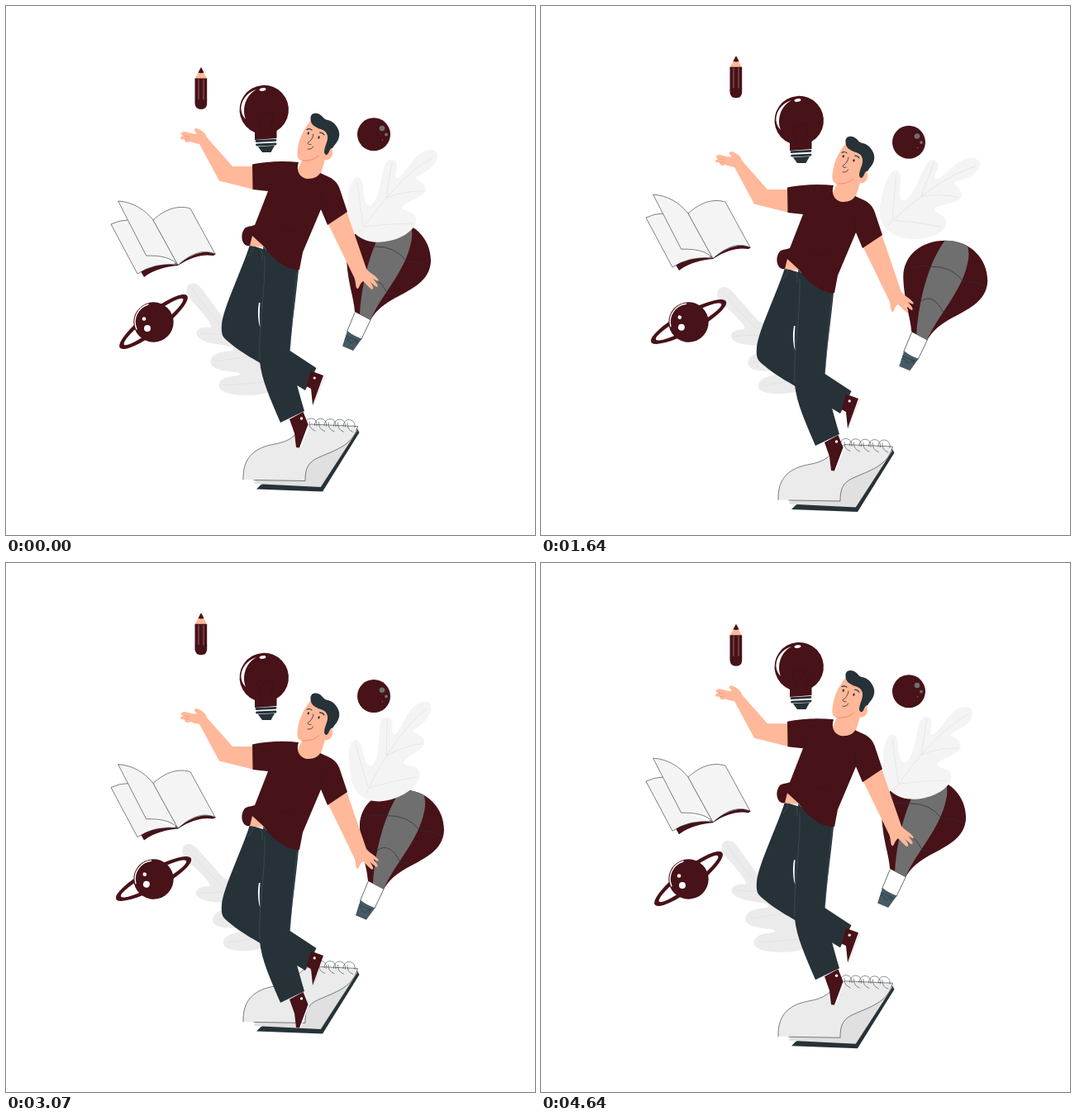
Animation of 640x640 px, one loop 4.71 s. Source, as an HTML page with a canvas:

```html
<!DOCTYPE html>
<html lang="en">
<head>
<meta charset="utf-8">
<title>Balancing ideas</title>
<style>
html, body { margin: 0; width: 100%; height: 100%; overflow: hidden; background: #fff; }
canvas { display: block; width: 100vw; height: 100vh; }
</style>
</head>
<body>
<canvas id="stage"></canvas>
<script>
const SIZE = 640, LOOP = 4710;
const MAROON = '#471218', DARK = '#263238', SKIN = '#ffb899', GREY = '#6f6f6f';
const PAGE = '#f4f4f4', SHEET = '#ebebeb', SHADE = '#e0e0e0', SLATE = '#455a64', WHITE = '#fff';

const canvas = document.getElementById('stage');
const ctx = canvas.getContext('2d');
const ratio = Math.max(1, window.devicePixelRatio || 1);
canvas.width = canvas.height = SIZE * ratio;
ctx.lineCap = ctx.lineJoin = 'round';

const paths = new Map();
function shape(d) {
  if (!paths.has(d)) paths.set(d, new Path2D(d));
  return paths.get(d);
}
function fill(d, color) {
  ctx.fillStyle = color;
  ctx.fill(shape(d));
}
function line(d, color = DARK, width = 0.7) {
  ctx.strokeStyle = color;
  ctx.lineWidth = width;
  ctx.stroke(shape(d));
}
function oval(x, y, rx, color, ry = rx, turn = 0) {
  ctx.fillStyle = color;
  ctx.beginPath();
  ctx.ellipse(x, y, rx, ry, turn, 0, Math.PI * 2);
  ctx.fill();
}
function moved(x, y, draw) {
  ctx.save();
  ctx.translate(x, y);
  draw();
  ctx.restore();
}
function turned(x, y, degrees, draw) {
  ctx.save();
  ctx.translate(x, y);
  ctx.rotate(degrees * Math.PI / 180);
  ctx.translate(-x, -y);
  draw();
  ctx.restore();
}

// Smooth periodic curve through [ms, value] pairs
function curve(keys) {
  const n = keys.length;
  const key = i => {
    const turn = Math.floor(i / n), [t, v] = keys[i - turn * n];
    return [t + turn * LOOP, v];
  };
  const slope = i => {
    const [t0, v0] = key(i - 1), [t1, v1] = key(i + 1);
    return (v1 - v0) / (t1 - t0);
  };
  return t => {
    let i = n - 1;
    while (i > 0 && keys[i][0] > t) i--;
    const [t0, v0] = key(i), [t1, v1] = key(i + 1);
    const h = t1 - t0, u = (t - t0) / h, w = 1 - u;
    return v0 * (1 + 2 * u) * w * w + v1 * u * u * (3 - 2 * u)
      + h * u * w * (slope(i) * w - slope(i + 1) * u);
  };
}
// Gentle ease in and out, rising over the first part of a cycle
const ease = p => 0.85 * (1 - Math.cos(Math.PI * p)) / 2 + 0.15 * p;
const rise = (p, top) => ease(p < top ? p / top : (1 - p) / (1 - top));
const bob = (t, cycles = 1) => rise(cycles * t / LOOP % 1, 0.5);
const drift = t => rise(t / LOOP, 0.38);
const swing = curve([[0, 0], [500, 5], [1140, 18], [1640, 24.5], [2070, 19], [2570, 0],
  [3070, -18], [3430, -23.5], [3790, -17.5], [4000, -13], [4570, -0.8]]);
const flutter = curve([[0, 0], [500, -2], [1210, -7.5], [1560, -8.2], [2070, -5],
  [3070, 7.6], [3430, 8.2], [3790, 6.2], [4570, 0.4]]);

function balloon() {
  const body = 'M422 370C421 352 413 335 412 304C412 277 434 259.500 463 259.500C493 259.500 514 281 514 308.500C513 334 489 343 466 356C454 363 446 371 441 380Z';
  fill(body, MAROON);
  ctx.save();
  ctx.clip(shape(body));
  fill('M463 259C446 280 431 325 428 373L441 380C452 352 483 322 490 286C493 274 490 264 486 258Z', GREY);
  line('M412 297Q429 287 446 291Q470 290 485 309Q501 309 513 316M420 335Q425 331 433 333Q448 322 461 347Q469 347 476 352', DARK, 0.7);
  ctx.restore();
  line('M422 371L412.500 394M441 380L430 403');
  fill('M413 393Q420 399 430.500 402.500L420 417L407 411.500Z', SLATE);
  line('M411 399L426 405M410 403Q413 400 415 405T421 406T424 408', DARK, 0.6);
}

function paleLeaf() {
  fill('M514 174C525 174 524 186 516 194C508 202 498 204 495 209C502 211 510 218 507 225C502 233 486 235 479 243C478 249 490 246 495 254C499 262 494 269 484 276C470 285 450 288 437 284C420 278 413 266 414 250C413 235 414 218 420 210C426 204 431 208 432 219C433 231 434 243 441 241C451 236 453 210 458 193C463 182 473 185 473 194C470 206 470 212 478 205C488 196 496 174 514 174Z', '#f4f4f4');
  line('M428 274Q450 242 474 217Q494 196 517 183M425 213L432 266M467 189L460 232Q484 223 505 224M434 267Q464 263 492 263', '#dedede', 0.6);
}

function greyLeaf() {
  fill('M219 347C216 336 228 331 236 341C246 354 257 370 265 380L298 402L330 440C335 455 325 466 312 469C295 472 270 472 261 465C254 460 258 452 268 449C276 447 284 448 283 444C275 442 255 442 249 435C244 427 252 419 266 418C273 417 277 417 274 413C265 409 240 410 232 400C227 393 235 387 247 389C250 386 243 378 235 368C228 360 221 354 219 347Z', SHEET);
  line('M225 341Q255 386 318 448M235 396L268 398M254 430L294 424M264 459L315 455', '#dedede', 0.6);
}

function notebook() {
  fill('M312 577L308 579.500L303 584.500L383 587.500L427.500 516L424 510Z', DARK);
  fill('M302 573L300 578L381 582L425 514L422 509L340 545Z', SHADE);
  fill('M287 573C286 545 302 534 325 530C352 525 348 515 368 506L425.500 508.500C420 530 402 536 381 545C366 551 362 558 362 574.500Z', SHEET);
  line('M300 573.500L362 574.500C362 558 366 551 381 545C402 536 420 530 425.500 508.500L368 506C348 515 352 525 325 530C302 534 286 545 287 573', DARK, 0.6);
  line('M381 582L426 513', DARK, 0.5);
  for (let i = 0; i < 5; i++) {
    moved(i * 11.5, i * 0.4, () => line('M362 507C362 495 378 497 376 508M367 503Q366 511 374 514', DARK, 0.55));
  }
}

function legs() {
  fill('M295 289C285 320 263 365 261 385C260 398 262 401 270 407C285 420 305 430 314 436L362 465L375.500 438L342 416L330 300Z', DARK);
  fill('M306 359C304 370 305 382 307.500 389C306.500 380 306.500 370 307.500 359Z', WHITE);
  fill('M311 290C322 306 340 318 354 319C351 350 346 385 343.500 417C347 442 354 466 361 490L332 504C320 476 309 452 307 430C305 400 314 345 311 290Z', DARK);
  line('M313 303C314 345 305 390 307 428M352 322Q346 380 343.500 416M299 291Q298 299 292 303M309 295Q311 300 310 306', SLATE, 0.6);
  fill('M369 441.500L384 447L371 483L369 463L363.500 460Z', MAROON);
  line('M385.500 448.500L372 483', '#d5d5d5', 0.7);
  fill('M343 500L359.500 491L365.500 506L355 534.500L351 534L349 517Z', MAROON);
  line('M366.500 507L356 534', WHITE, 1.2);
  oval(373.200, 450, 1.6, WHITE);
  oval(357.500, 499, 1.7, WHITE);
}

function face() {
  fill('M368 139C358 152 354 163 353 173C351 182 354 187 358 187L353 198C351 214 380 214 382 199L386 186C390 188 396 182 395 177L392 150Z', SKIN);
  line('M359 187Q371 188 378 181', '#f08b6c', 1);
  fill('M368.500 136C368 128 378 128 383 134C386 139 392 137 397 142C402 147 404 153 403 158C402 164 398 167 395 172C391 171 391 181 387 180C383 178 386 171 388 165C391 157 388 151 381 149C374 147 368 143 368.500 136Z', DARK);
  oval(365.800, 154, 1.1, DARK, 1.7, 0.3);
  oval(378.500, 159, 1.1, DARK, 1.7, 0.3);
  line('M364 149.500Q367 147.500 370 150M379.500 153Q383 153 385 156', DARK, 1.1);
  line('M372 155Q371 162 365 165.500Q365 168 369 167.500M365 173Q370 174 371.500 170', DARK, 0.8);
}

function man() {
  legs();
  fill('M300 194L274 194L243 159C241 152 235 150 231 148C226 148 228 152 231 154C227 156 222 153 216 152C209 153 212 157 215 157C209 158 210 163 216 161C216 165 219 166 223 164C227 166 231 166 234 167L258 211.500L300 222Z', SKIN);
  line('M215 157L222 158M216 161L222 161', '#f08b6c', 0.6);
  fill('M389 262L412 248L436 318C441 324 448 326 451 332C450 334 446 331 444 330C448 335 451 338 449 340C446 339 441 334 440 333C443 338 446 341 443 343C438 340 435 335 432 333C428 335 427 343 425 342C422 340 424 332 420 326L406 297Z', SKIN);
  fill('M298 276L312 292L294 290Z', SKIN);
  face();
  fill('M298 191.500C315 188 335 187 354 189C350 201 357 209 366 209C373 209 378 206 380 202L391 207C399 211 402 216 404 222L413 249L389 265L381 246L359 298L355 319C340 320 322 306 312 291L298 278L295 290C285 292 282 275 290 268C295 266 299 266 301 265L317 224L298.500 222Z', MAROON);
  line('M318 224Q321 218 323 212M381 245Q378 235 383 222M328 271Q338 276 351 270M299 278L304 272', '#2f1c22', 0.7);
}

function book() {
  fill('M163 321L167 328C180 318 196 315 208 314C225 303 238 300 251 302L254 300C238 293 222 303 208 311L172 315Z', MAROON);
  fill('M127 264Q137 259 147 259L171 301L208 313Q180 310 159 324Z', PAGE);
  line('M147 259Q137 259 127 264L159 324Q180 310 208 313', DARK, 0.6);
  const right = 'M178 259C194 244 210 241 223 245L253 300C237 293 222 301 208 313.500Z';
  fill(right, PAGE);
  line(right, DARK, 0.6);
  const turning = 'M136 236C153 237 168 246 178 259L208 313.500C200 304 187 302 170 302Z';
  fill(turning, PAGE);
  line(turning, DARK, 0.6);
}

function saturn() {
  const tilt = -0.661;
  oval(178.500, 382, 51.500, MAROON, 12.4, tilt);
  oval(178.500, 382, 45, WHITE, 7.6, tilt);
  oval(178.500, 382.500, 24.200, MAROON);
  line('M172 361A22 22 0 0 0 158 391', WHITE, 1.4);
  oval(167, 378.500, 2.3, WHITE);
  oval(171, 390, 4, WHITE);
}

function bulb() {
  fill('M301 162V153A29.700 29.700 0 1 1 327.500 151V160Z', MAROON);
  fill('M303 101C285 107 279 126 290 137C285 124 290 108 303 101Z', WHITE);
  oval(310.500, 101, 4, WHITE, 1.8, -0.15);
  line('M309 151L304 132Q309 126 311 134Q315 126 317 134Q322 126 324 133L319 151', '#35161d', 0.8);
  line('M303 163.500L326 162.300M303.500 168L326 167', DARK, 2.8);
  fill('M305 170L325 169L323 172.500L320.500 177H310L307 173Z', DARK);
}

function pencil() {
  fill('M236 74L243 88H228.500Z', SKIN);
  fill('M236 74L239.500 80.500Q236 82 232.500 80.500Z', MAROON);
  fill('M228.500 87.500H243.200V118Q243 125 236 125Q229 125 228.500 118Z', MAROON);
  line('M233 89V113M239 89V113', '#b08a8d', 0.7);
  line('M229 115Q232 111 235 115T243 114', '#2f1c22', 0.7);
}

function ball() {
  oval(445, 155.300, 20, MAROON);
  oval(455, 148, 3.3, GREY);
  oval(460, 155.500, 1.9, GREY);
  oval(455.500, 162, 0.8, GREY);
}

function render(t) {
  ctx.setTransform(ratio, 0, 0, ratio, 0, 0);
  ctx.fillStyle = WHITE;
  ctx.fillRect(0, 0, SIZE, SIZE);
  const d = drift(t), s = swing(t), b = bob(t);
  moved(27 * d, 25 * d, balloon);
  turned(468, 230, 0.48 * s, paleLeaf);
  turned(270, 402, -7 * b, greyLeaf);
  moved(0, s, notebook);
  moved(0, 36 * b, man);
  moved(0, flutter(t), book);
  turned(178.5, 382.5, 12 * b, saturn);
  moved(0, 16.8 * b, bulb);
  moved(0, -21 * bob(t, 2), pencil);
  moved(0, 9.8 * d, ball);
}

const start = performance.now();
function tick(now) {
  render(Math.max(0, now - start) % LOOP);
  requestAnimationFrame(tick);
}
render(0);
requestAnimationFrame(tick);
</script>
</body>
</html>
```
